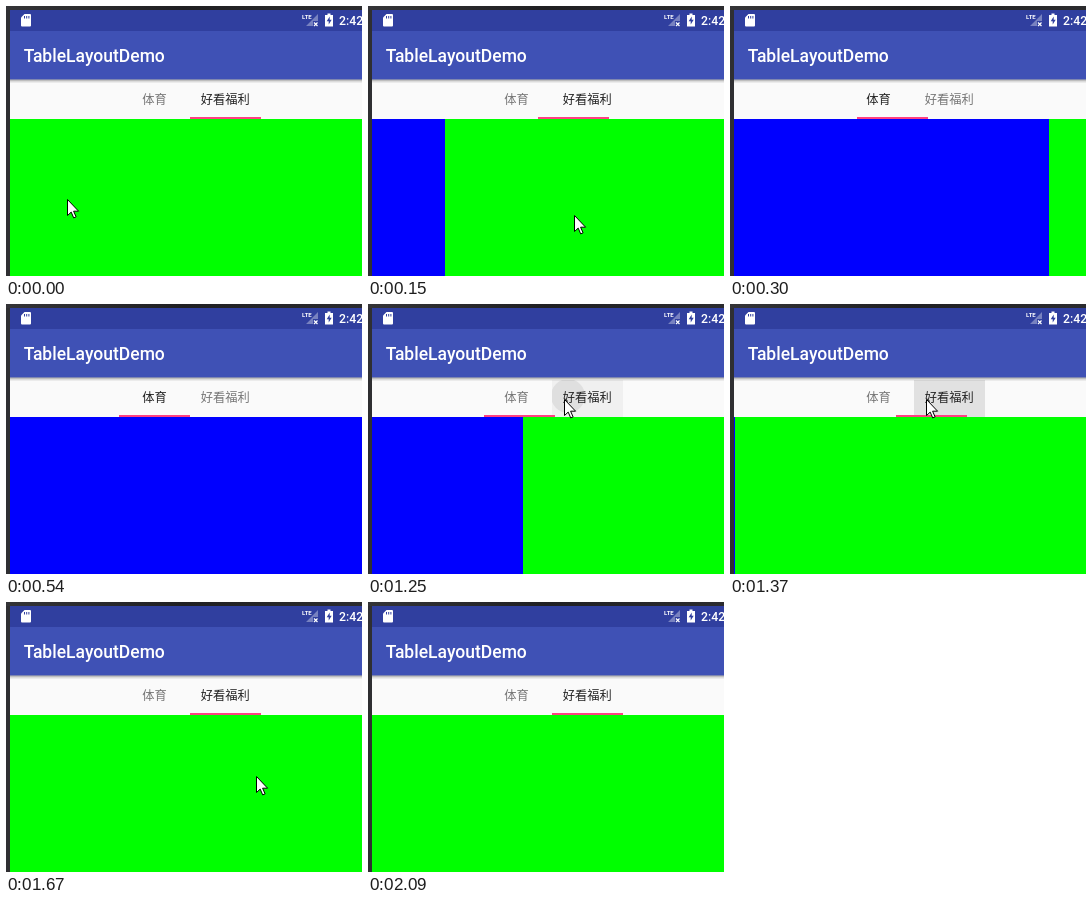
An HTML page for the animation above (2480 ms loop, 356 by 270 pixels).

```html
<!DOCTYPE html>
<html lang="zh-CN">
<head>
<meta charset="utf-8">
<title>TableLayoutDemo</title>
<style>
html, body { margin: 0; width: 100%; height: 100%; overflow: hidden; background: #29292c; }
svg { display: block; width: 356px; height: 270px; }
text { font-family: Roboto, "Noto Sans", sans-serif; font-weight: 500; fill: #fff; }
.tab { font: 400 12.25px "Noto Sans CJK SC", "Noto Sans CJK", "Noto Sans CJK JP", sans-serif; }

/* Screen updates are hard steps on one shared 2480 ms clock. */
.anim { animation: 2480ms step-end infinite; }
.page { animation-name: page; }
.bar { animation-name: bar; }
.first { animation-name: first; }
.second { animation-name: second; }
.press { animation-name: press; }
.spot { animation-name: spot; }
.mouse { animation-name: mouse; }

@keyframes page {
  0% { transform: translateX(4px); }
  6.04% { transform: translateX(77px); }
  12.09% { transform: translateX(319px); }
  16.93% { transform: translateX(353px); }
  21.77% { transform: translateX(364px); }
  50.4% { transform: translateX(155px); }
  55.24% { transform: translateX(5px); }
  61.29%, 100% { transform: translateX(4px); }
}
@keyframes bar {
  0% { transform: translateX(184px); }
  6.04% { transform: translateX(169.5px); }
  12.09% { transform: translateX(127px); }
  16.93% { transform: translateX(115px); }
  21.77% { transform: translateX(113px); }
  50.4% { transform: translateX(116px); }
  55.24% { transform: translateX(166px); }
  61.29%, 100% { transform: translateX(184px); }
}
@keyframes first {
  0% { fill: #757575; }
  12.09% { fill: #212121; }
  50.4%, 100% { fill: #757575; }
}
@keyframes second {
  0% { fill: #212121; }
  12.09% { fill: #757575; }
  50.4%, 100% { fill: #212121; }
}
@keyframes press {
  0% { opacity: 0; }
  50.4% { opacity: .04; }
  55.24% { opacity: .1; }
  61.29% { opacity: .05; }
  67.33%, 100% { opacity: 0; }
}
@keyframes spot {
  0% { opacity: 0; }
  50.4% { opacity: .07; }
  55.24%, 100% { opacity: 0; }
}
@keyframes mouse {
  0% { transform: translate(61px, 193px); }
  6.04% { transform: translate(206px, 209px); }
  12.09% { transform: translate(380px, 209px); }
  28.22% { transform: translate(235px, 124px); }
  33.06% { transform: translate(196px, 95px); }
  67.33% { transform: translate(250px, 174px); }
  73.79% { transform: translate(276px, 230px); }
  79.43% { transform: translate(290px, 257px); }
  84.27%, 100% { transform: translate(300px, 300px); }
}
</style>
</head>
<body>
<svg viewBox="0 0 356 270">
  <defs>
    <linearGradient id="edge" x2="1" y2="0">
      <stop stop-color="#343437"/>
      <stop offset=".5" stop-color="#1f1f22"/>
      <stop offset="1" stop-color="#2b2b2e"/>
    </linearGradient>
    <linearGradient id="shade" x2="0" y2="1">
      <stop stop-opacity=".36"/>
      <stop offset=".5" stop-opacity=".12"/>
      <stop offset="1" stop-opacity="0"/>
    </linearGradient>
    <clipPath id="cell"><path d="M184 76h71v37h-71z"/></clipPath>
  </defs>

  <rect width="356" height="4" fill="url(#edge)"/>
  <rect y="4" width="4" height="266" fill="#2f2f32"/>

  <!-- Status bar -->
  <rect x="4" y="4" width="352" height="21" fill="#303f9f"/>
  <path d="M18.5 8H24a1 1 0 0 1 1 1v10.500a1 1 0 0 1-1 1h-8a1 1 0 0 1-1-1V11.500z" fill="#fff"/>
  <path d="M18.500 10v2.500M20.700 10v2.500M22.900 10v2.500" stroke="#303f9f"/>
  <text x="296" y="13" font-size="6" style="font-weight:700" textLength="">LTE</text>
  <path d="M312 8v7h-5v5h-7z" fill="#fff" fill-opacity=".35"/>
  <path d="M308 16.500l3.500 3.500m0-3.500l-3.500 3.500" stroke="#fff" stroke-width="1.200"/>
  <path d="M321.500 7.500h3V9H327v11.500h-8V9h2.500z" fill="#fff"/>
  <path d="M323.700 10.500l-3 4.800h2v3.200l3-4.800h-2z" fill="#303f9f"/>
  <text x="333" y="19" font-size="12.250">2:42</text>

  <!-- Toolbar and tabs -->
  <rect x="4" y="25" width="352" height="49" fill="#3f51b5"/>
  <text x="17.700" y="56" font-size="17.500">TableLayoutDemo</text>
  <rect x="4" y="73.500" width="352" height="40" fill="#fafafa"/>
  <g clip-path="url(#cell)">
    <rect class="anim press" x="184" y="76" width="71" height="37" opacity="0"/>
    <circle class="anim spot" cx="200" cy="92" r="17" opacity="0"/>
  </g>
  <rect x="4" y="73.500" width="352" height="4" fill="url(#shade)"/>
  <text class="tab anim first" x="136.300" y="98">体育</text>
  <text class="tab anim second" x="194.800" y="98">好看福利</text>
  <rect class="anim bar" y="111" width="71" height="2" fill="#ff4081"/>

  <!-- Pages -->
  <rect x="4" y="113" width="352" height="157" fill="#00f"/>
  <rect class="anim page" y="113" width="360" height="157" fill="#0f0"/>

  <path class="anim mouse" d="M.5.5v16l3.700-3.400 2.500 5.800 2.400-1-2.500-5.700h5z" fill="#fff" stroke="#000"/>
</svg>
</body>
</html>
```
